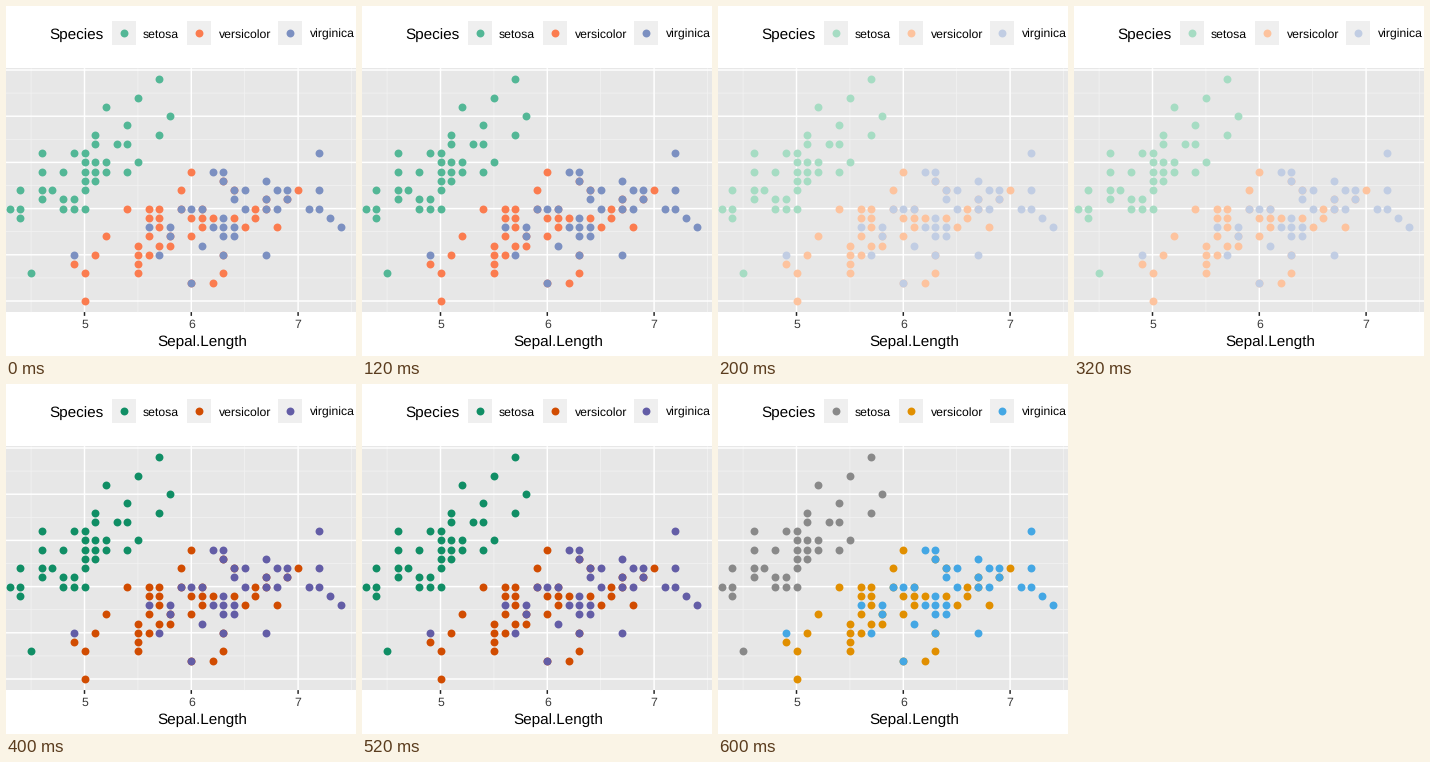
Recreate the animation shown at these times as a matplotlib script. Size 350 px wide and 350 px high, loop 0.8 s.

```python
import matplotlib.pyplot as plt
import numpy as np
from matplotlib.animation import FuncAnimation
from matplotlib.colors import to_rgb
from matplotlib.patches import Rectangle

SIZE, DPI = 350, 100
PT = 72 / DPI  # points per pixel
plt.rcParams.update({"font.family": "Liberation Sans", "text.hinting": "none"})

# Tenths of a unit: sepal length -> sepal widths
SETOSA = {
    43: [30], 44: [29, 30, 32], 45: [23], 46: [31, 32, 34, 36], 47: [32],
    48: [30, 31, 34], 49: [30, 31, 36], 50: [30, 32, 33, 34, 35, 36],
    51: [33, 34, 35, 37, 38], 52: [34, 35, 41], 53: [37], 54: [34, 37, 39],
    55: [35, 42], 57: [38, 44], 58: [40],
}
VERSICOLOR = {
    49: [24], 50: [20, 23], 51: [25], 52: [27], 54: [30],
    55: [23, 24, 25, 26], 56: [25, 27, 29, 30], 57: [26, 28, 29, 30],
    58: [26, 27], 59: [30, 32], 60: [22, 27, 29, 34], 61: [28, 29, 30],
    62: [22, 29], 63: [23, 25, 33], 64: [29, 32], 65: [28], 66: [29, 30],
    67: [30, 31], 68: [28], 69: [31], 70: [32],
}
VIRGINICA = {
    49: [25], 56: [28], 57: [25], 58: [27, 28], 59: [30], 60: [22, 30],
    61: [26, 30], 62: [28, 34], 63: [25, 27, 28, 29, 33, 34],
    64: [27, 28, 31, 32], 65: [30, 32], 67: [25, 30, 31, 33], 68: [30, 32],
    69: [31, 32], 71: [30], 72: [30, 32, 36], 73: [29], 74: [28],
}
# name, data, legend key centre
SPECIES = [
    ("setosa", SETOSA, 117.5),
    ("versicolor", VERSICOLOR, 192.9),
    ("virginica", VIRGINICA, 284.2),
]
LEGEND_Y = 27.2


def tone(color):
    """Deepen a colour with a display gamma."""
    return tuple(np.array(to_rgb(color)) ** 1.22)


def px(length):
    return 78.5 + (length - 5) * 106.8


def py(width):
    return 295 - (width - 2) * 92.4


PALETTES = [
    [tone(c) for c in palette]
    for palette in (
        plt.get_cmap("Set2").colors[:3],
        plt.get_cmap("Pastel2").colors[:3],
        plt.get_cmap("Dark2").colors[:3],
        ("#999999", "#E69F00", "#56B4E9"),
    )
]

fig = plt.figure(figsize=(SIZE / DPI, SIZE / DPI), dpi=DPI, facecolor="white")
ax = fig.add_axes([0, 0, 1, 1])
ax.set(xlim=(0, SIZE), ylim=(SIZE, 0))
ax.axis("off")

TOP, BOTTOM = py(4.52), py(1.88)


def rect(x, y, w, h, color):
    ax.add_patch(Rectangle((x, y), w, h, fc=tone(color), lw=0, zorder=0))


def line(xs, ys, width, color):
    ax.plot(xs, ys, color=tone(color), lw=width * PT, zorder=1,
            snap=False, solid_capstyle="butt")


def grid(lengths, widths, thickness, color):
    for v in lengths:
        line([px(v)] * 2, [TOP, BOTTOM], thickness, color)
    for v in widths:
        line([0, SIZE], [py(v)] * 2, thickness, color)


def label(x, y, text, size, color="black", ha="left"):
    ax.text(x, y, text, fontsize=size, color=tone(color), ha=ha, va="baseline")


rect(0, TOP, SIZE, BOTTOM - TOP, "#EBEBEB")
grid(np.arange(4.5, 8), np.arange(2.25, 4.5, 0.5), 0.74, "#F5F5F5")
grid((5, 6, 7), np.arange(2, 4.6, 0.5), 1.48, "white")

for v in (5, 6, 7):
    line([px(v)] * 2, [BOTTOM, BOTTOM + 3.8], 1.48, "#333333")
    label(px(v), 322, str(v), 8.8, "#4D4D4D", "center")
label(196, 340, "Sepal.Length", 11, ha="center")
label(43, 33, "Species", 11)

dots = []
for name, data, key_x in SPECIES:
    rect(key_x - 12, LEGEND_Y - 12, 24, 24, "#F2F2F2")
    label(key_x + 19.6, 32, name, 8.8)
    points = [(px(l / 10), py(w / 10)) for l, ws in data.items() for w in ws]
    points.append((key_x, LEGEND_Y))
    dots.append(ax.scatter(*zip(*points), s=(7.9 * PT) ** 2, lw=0, zorder=2))


def update(frame):
    for dot, color in zip(dots, PALETTES[frame]):
        dot.set_facecolor([color])
    return dots


anim = FuncAnimation(fig, update, frames=len(PALETTES), interval=200,
                     repeat=True, repeat_delay=0)
plt.show()
```
